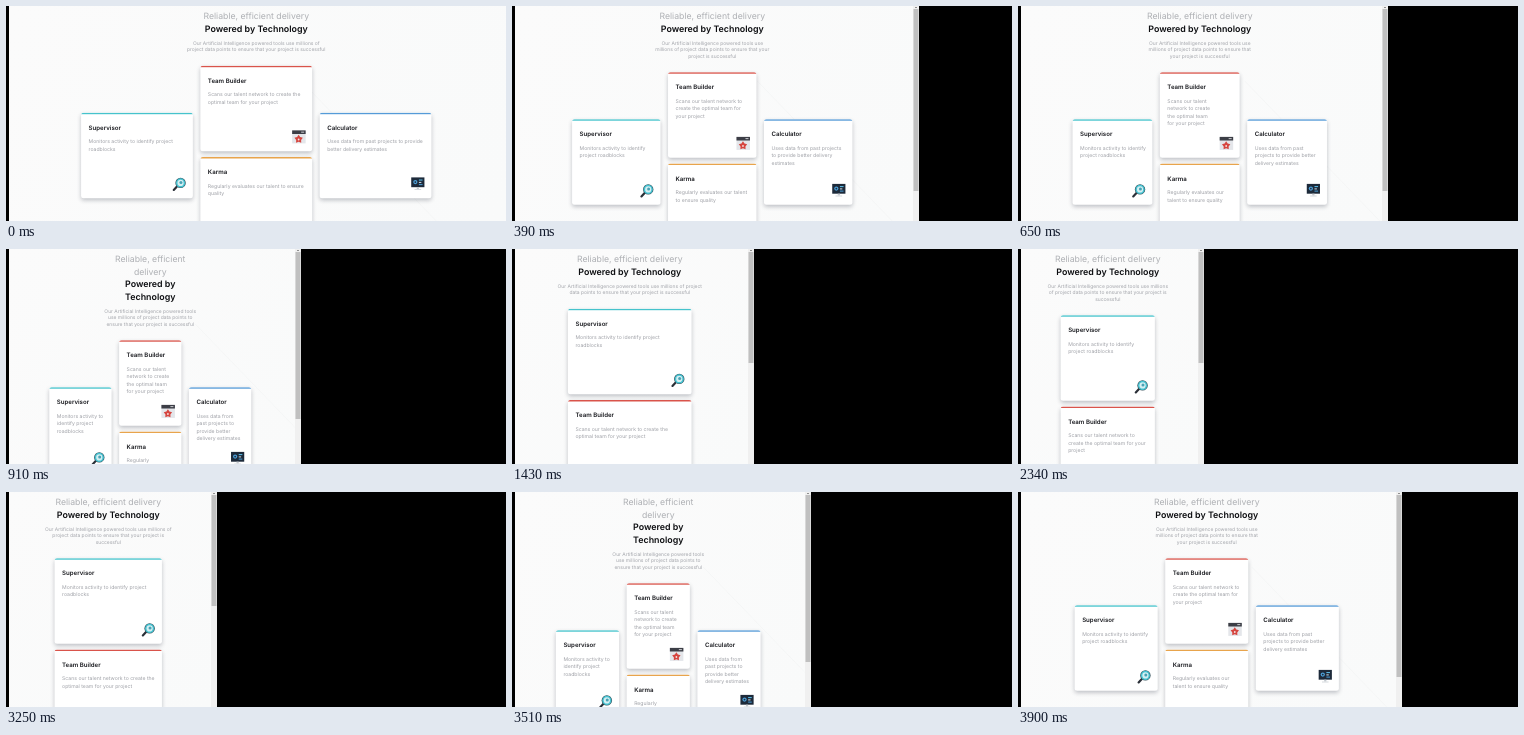
An HTML page with a canvas for the animation above (4030 ms loop, 500x215 px).

```html
<!DOCTYPE html>
<html lang="en">
<head>
<meta charset="utf-8">
<title>Responsive cards</title>
<style>
html, body { margin: 0; width: 100%; height: 100%; overflow: hidden; background: #000; }
canvas { display: block; width: 500px; height: 215px; }
</style>
</head>
<body>
<canvas id="stage" width="500" height="215"></canvas>
<script>
const ctx = document.getElementById('stage').getContext('2d');
const LOOP = 4030;
const FONT = 'Inter, "Open Sans", sans-serif';

// Window width from each moment on; the window jumps between them.
const widths = [
  [0, 507], [130, 473], [260, 440], [390, 407],
  [650, 370], [780, 332], [910, 295],
  [1170, 277], [1300, 260], [1430, 242],
  [1690, 225], [1820, 200], [1950, 210],
  [2210, 197], [2340, 186],
  [3250, 211], [3380, 255], [3510, 299],
  [3770, 342], [3900, 384]
];

// Line breaks, each with the smallest column that holds them.
const titleLight = [[105, 'Reliable, efficient delivery'], [0, 'Reliable, efficient|delivery']];
const titleBold = [[102, 'Powered by Technology'], [0, 'Powered by|Technology']];
const intro = [
  [143, 'Our Artificial Intelligence powered tools use millions of project|data points to ensure that your project is successful'],
  [139, 'Our Artificial Intelligence powered tools use millions of|project data points to ensure that your project is successful'],
  [125, 'Our Artificial Intelligence powered tools use millions of|project data points to ensure that your project is|successful'],
  [119, 'Our Artificial Intelligence powered tools use millions|of project data points to ensure that your project is|successful'],
  [115, 'Our Artificial Intelligence powered tools use|millions of project data points to ensure that your|project is successful'],
  [103, 'Our Artificial Intelligence powered tools use|millions of project data points to ensure that|your project is successful'],
  [0, 'Our Artificial Intelligence powered tools|use millions of project data points to|ensure that your project is successful']
];

const supervisor = {
  name: 'Supervisor', color: '#45c3cc', icon: drawLens,
  text: [
    [84, 'Monitors activity to identify project|roadblocks'],
    [64, 'Monitors activity to identify|project roadblocks'],
    [0, 'Monitors activity to|identify project|roadblocks']
  ]
};
const team = {
  name: 'Team Builder', color: '#d9544b', icon: drawWindow,
  text: [
    [92, 'Scans our talent network to create the|optimal team for your project'],
    [79, 'Scans our talent network to|create the optimal team for your|project'],
    [65, 'Scans our talent network to|create the optimal team for|your project'],
    [0, 'Scans our talent|network to create|the optimal team|for your project']
  ]
};
const karma = {
  name: 'Karma', color: '#e8a44c',
  text: [
    [96, 'Regularly evaluates our talent to ensure|quality'],
    [73, 'Regularly evaluates our talent|to ensure quality'],
    [58, 'Regularly evaluates our|talent to ensure quality'],
    [0, 'Regularly|evaluates our|talent to ensure|quality']
  ]
};
const calculator = {
  name: 'Calculator', color: '#559bd8', icon: drawMonitor,
  text: [
    [96, 'Uses data from past projects to provide|better delivery estimates'],
    [77, 'Uses data from past projects to|provide better delivery|estimates'],
    [70, 'Uses data from past projects|to provide better delivery|estimates'],
    [62, 'Uses data from past|projects to provide better|delivery estimates'],
    [0, 'Uses data from|past projects to|provide better|delivery estimates']
  ]
};

function rect(x, y, w, h, color) {
  ctx.fillStyle = color;
  ctx.fillRect(x, y, w, h);
}

function disc(x, y, r, color) {
  ctx.fillStyle = color;
  ctx.beginPath();
  ctx.arc(x, y, r, 0, Math.PI * 2);
  ctx.fill();
}

function line(x1, y1, x2, y2, width, color) {
  ctx.strokeStyle = color;
  ctx.lineWidth = width;
  ctx.beginPath();
  ctx.moveTo(x1, y1);
  ctx.lineTo(x2, y2);
  ctx.stroke();
}

function fit(options, room) {
  return options.find(([min]) => room >= min)[1].split('|');
}

// Draws lines of text and returns the height they take.
function write(lines, x, y, size, weight, step, color, align) {
  ctx.font = `${weight} ${size}px ${FONT}`;
  ctx.textAlign = align;
  ctx.fillStyle = color;
  lines.forEach((s, i) => ctx.fillText(s, x, y + i * step));
  return lines.length * step;
}

// Icons fill a 14 by 14 box.
function drawLens() {
  ctx.lineCap = 'round';
  line(1.4, 13, 4.6, 9.6, 2.2, '#2b3038');
  ctx.lineCap = 'butt';
  disc(8.2, 6, 5.2, '#37505a');
  disc(8.2, 6, 4.6, '#45c3d2');
  disc(8.2, 6, 3.1, '#d5eff2');
  disc(8.6, 5.6, 1.5, '#4aa3b5');
}

function drawWindow() {
  rect(0.5, 0.5, 13.5, 13, '#e4e6ea');
  rect(0.5, 0.5, 13.5, 3.6, '#3c3e46');
  rect(9.5, 1.8, 3, 0.9, '#d9dade');
  ctx.fillStyle = '#d6453f';
  ctx.beginPath();
  for (let i = 0; i < 10; i++) {
    const r = i % 2 ? 2.6 : 4.4;
    const a = i * Math.PI / 5 - Math.PI / 2;
    ctx.lineTo(7 + r * Math.cos(a), 9.2 + r * Math.sin(a));
  }
  ctx.fill();
  disc(7, 9.6, 0.9, '#f3e3e2');
}

function drawMonitor() {
  rect(0.3, 0.5, 13.2, 9.8, '#1d2a3a');
  disc(4.4, 5.2, 2.1, '#4c9fd8');
  disc(4.4, 5.2, 0.9, '#1d2a3a');
  rect(8, 2.6, 3.6, 1.1, '#58b5e0');
  rect(8, 5, 2.4, 1, '#d4e2ea');
  rect(8, 7.2, 3.6, 1, '#4c9fd8');
  rect(5.8, 10.3, 2.2, 1.8, '#c3c9cf');
  rect(3.6, 12.1, 6.6, 1, '#d6dade');
}

function drawCard(card, x, y, w) {
  const h = 85.5;
  ctx.save();
  ctx.shadowColor = 'rgba(60, 66, 80, 0.32)';
  ctx.shadowBlur = 4.5;
  ctx.shadowOffsetY = 2;
  ctx.fillStyle = '#fff';
  ctx.beginPath();
  ctx.roundRect(x, y, w, h, 2.5);
  ctx.fill();
  ctx.restore();

  ctx.save();
  ctx.clip();
  rect(x, y, w, 1.5, card.color);
  ctx.restore();

  write([card.name], x + 7.5, y + 17.2, 6.12, 600, 7, '#17181d', 'left');
  write(fit(card.text, w - 15), x + 7.5, y + 30.7, 5.13, 400, 7.4, '#9fa1a7', 'left');

  if (card.icon) {
    ctx.save();
    ctx.translate(x + w - 20.5, y + h - 21.3);
    card.icon();
    ctx.restore();
  }
}

function drawScrollbar(right, single) {
  const end = single ? 114 : right < 335 ? 170 : 185;
  rect(right - 6, 0, 6, 215, '#f0f0f0');
  rect(right - 5.5, 3, 5, end - 3, '#c0c0c0');
  rect(right - 3.8, 1, 1.6, 1, '#777');
}

function drawPage(width) {
  const page = width - 6.5;
  const mid = page / 2;
  const single = width < 280;
  const column = page * (single ? 0.525 : 0.7 / 3);
  const room = column + 25;

  ctx.save();
  ctx.beginPath();
  ctx.rect(0, 0, width, 215);
  ctx.clip();

  const shade = ctx.createLinearGradient(0, 0, page, 215);
  shade.addColorStop(0, '#fbfbfb');
  shade.addColorStop(1, '#f9fafa');
  rect(0, 0, width, 215, shade);
  if (!single) line(mid + 45, 75, mid + 180, 215, 0.8, '#f4f5f5');

  let y = 13;
  y += write(fit(titleLight, room), mid, y, 8.7, 400, 12.5, '#aeb0b4', 'center');
  y += write(fit(titleBold, room), mid, y, 8.9, 600, 12.5, '#0c0d10', 'center');
  y += 0.8;
  y += write(fit(intro, room), mid, y, 4.95, 400, 6.5, '#a2a4aa', 'center');

  const top = y + 7.9;
  if (single) {
    const x = mid - column / 2;
    [supervisor, team].forEach((card, i) => drawCard(card, x, top + i * 91.3, column));
  } else {
    const gap = 7.5;
    const w = (page * 0.7 - 2 * gap) / 3;
    const x = page * 0.15;
    drawCard(supervisor, x, top + 47, w);
    drawCard(team, x + w + gap, top, w);
    drawCard(karma, x + w + gap, top + 91.3, w);
    drawCard(calculator, x + 2 * (w + gap), top + 47, w);
  }
  drawScrollbar(width, single);
  ctx.restore();
}

function draw(now) {
  const t = now % LOOP;
  const width = widths.filter(([start]) => start <= t).pop()[1];
  rect(0, 0, 500, 215, '#000');
  ctx.textRendering = 'geometricPrecision';
  drawPage(width);
  rect(0, 0, 3, 215, '#000');
}

const start = performance.now();
function frame() {
  draw(performance.now() - start);
  requestAnimationFrame(frame);
}
frame();
</script>
</body>
</html>
```
